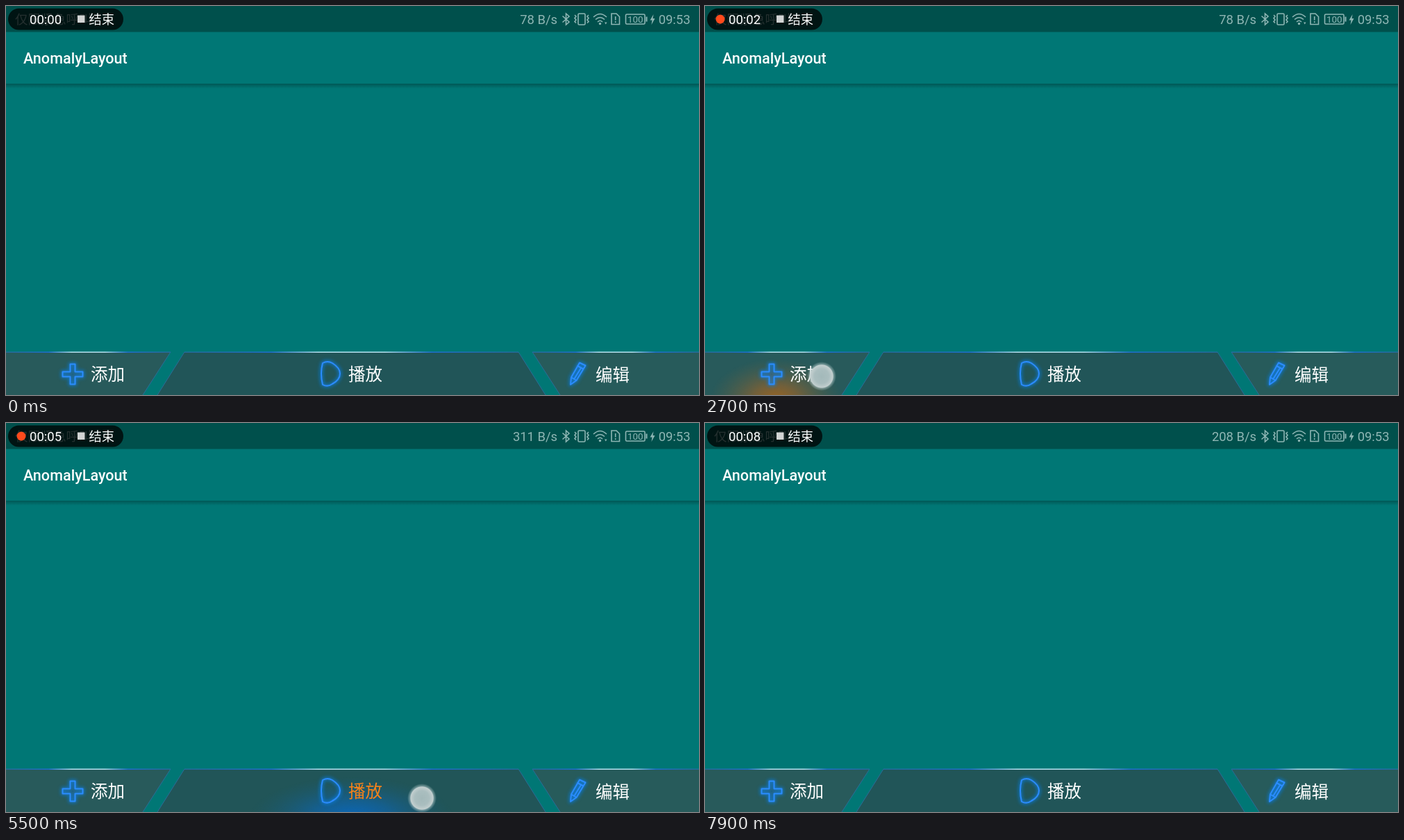
An HTML page that plays this animation: 998x561 px, repeating every 8 s.

```html
<!DOCTYPE html>
<html lang="zh-CN">
<head>
<meta charset="utf-8">
<title>AnomalyLayout</title>
<style>
  html, body { margin: 0; width: 100%; height: 100%; overflow: hidden; background: #007775; }
  svg { display: block; width: 998px; height: 561px; }
  text { font-family: Roboto, "Noto Sans CJK SC", "Noto Sans CJK", sans-serif; fill: #fff; }
  .status, .status text { font-size: 18.4px; fill: #8fb6b4; }
  .status .line { fill: none; stroke: #8fb6b4; stroke-width: 1.6; }
  .label { font-size: 24.5px; }
  .edge { fill: none; stroke: #2c6c98; stroke-width: 1; }
  .icon { fill: none; stroke-linejoin: round; stroke-linecap: round; }
  .icon .halo { stroke: #0a7fe8; stroke-width: 5; opacity: .7; filter: url(#soft); }
  .icon .core { stroke: #2b8dff; stroke-width: 2; }

  .anim { animation: 8s step-end infinite; }
  .dot { animation: blink 1s step-end infinite; }
  .left-on { animation-name: leftOn; }
  .mid-on { animation-name: midOn; }
  .mid-label { animation-name: midLabel; }
  .rate1 { animation-name: rate1; }
  .rate2 { animation-name: rate2; }
  .rate3 { animation-name: rate3; }
  .arrows { animation-name: arrows; }
  .touch { animation: touchOn 8s step-end infinite, drift 8s linear infinite; }

  @keyframes blink { 0% { opacity: 0 } 33% { opacity: 1 } 87%, 100% { opacity: 0 } }
  @keyframes leftOn { 0% { opacity: 0 } 11.7% { opacity: 1 } 37.1%, 100% { opacity: 0 } }
  @keyframes midOn { 0% { opacity: 0 } 47.1% { opacity: 1 } 92.1%, 100% { opacity: 0 } }
  @keyframes midLabel { 0% { fill: #fff } 47.1% { fill: #f5821a } 92.1%, 100% { fill: #fff } }
  @keyframes rate1 { 0% { opacity: 1 } 35.6%, 100% { opacity: 0 } }
  @keyframes rate2 { 0% { opacity: 0 } 35.6% { opacity: 1 } 74.7%, 100% { opacity: 0 } }
  @keyframes rate3 { 0% { opacity: 0 } 74.7%, 100% { opacity: 1 } }
  @keyframes arrows { 0% { opacity: 0 } 46.6% { opacity: 1 } 59.1%, 100% { opacity: 0 } }
  @keyframes touchOn {
    0% { opacity: 0 } 11.25% { opacity: 1 } 37.1% { opacity: 0 }
    46.6% { opacity: 1 } 92.1%, 100% { opacity: 0 }
  }
  @keyframes drift {
    0%, 15.4% { transform: translate(157px, 541px) }
    24.1%, 37.1% { transform: translate(168px, 534px) }
    46.6%, 53.7% { transform: translate(594px, 536px) }
    63.7%, 68.8% { transform: translate(599px, 541px) }
    86.2%, 100% { transform: translate(603px, 540px) }
  }
</style>
</head>
<body>
<svg viewBox="0 0 998 561">
  <defs>
    <filter id="soft" x="-50%" y="-50%" width="200%" height="200%"><feGaussianBlur stdDeviation="2.4"/></filter>
    <linearGradient id="shade" x2="0" y2="1">
      <stop stop-color="#003836" stop-opacity=".5"/><stop offset="1" stop-color="#003836" stop-opacity="0"/>
    </linearGradient>
    <linearGradient id="shine">
      <stop stop-color="#2a6fae" stop-opacity=".75"/>
      <stop offset=".26" stop-color="#1f6fd0"/>
      <stop offset=".4" stop-color="#b9e2f2"/>
      <stop offset=".6" stop-color="#b9e2f2"/>
      <stop offset=".74" stop-color="#1f6fd0"/>
      <stop offset="1" stop-color="#2a6fae" stop-opacity=".75"/>
    </linearGradient>
    <radialGradient id="amber" gradientUnits="userSpaceOnUse" cx="0" cy="0" r="1" gradientTransform="translate(102 568) scale(95 60)">
      <stop stop-color="#9a6420"/><stop offset=".35" stop-color="#8a6230" stop-opacity=".75"/>
      <stop offset="1" stop-color="#5c6048" stop-opacity="0"/>
    </radialGradient>
    <radialGradient id="azure" gradientUnits="userSpaceOnUse" cx="0" cy="0" r="1" gradientTransform="translate(498 568) scale(146 58)">
      <stop stop-color="#0a68bc"/><stop offset=".4" stop-color="#12629c" stop-opacity=".8"/>
      <stop offset="1" stop-color="#1c5a70" stop-opacity="0"/>
    </radialGradient>
    <radialGradient id="spot">
      <stop stop-color="#a3b9ba"/><stop offset=".5" stop-color="#aabebf"/>
      <stop offset=".77" stop-color="#c3cfcf"/><stop offset=".82" stop-color="#b8cccc" stop-opacity=".55"/>
      <stop offset="1" stop-color="#b8cccc" stop-opacity="0"/>
    </radialGradient>
    <path id="left" d="M0 499H237L197 561H0Z"/>
    <path id="mid" d="M257 499H738L777 561H218Z"/>
    <path id="right" d="M758 499H998V561H798Z"/>
    <path id="plus" d="M92.5 516.5h7v11h11v7h-11v11h-7v-11h-11v-7h11Z"/>
    <path id="play" d="M456 515Q463 511 470 515Q481 522 481 530Q481 539 470 545Q463 550 456 546Q452 530 456 515Z"/>
    <path id="pen" d="M826 514.5L834.5 518.5L821.5 540L813 546L814 535.5ZM823 519L831.5 523.5M814 535.5L821.5 540M827.5 523L818.5 537.5"/>
  </defs>

  <rect width="998" height="561" fill="#007775"/>
  <rect width="998" height="37.5" fill="#00504c"/>
  <rect y="112" width="998" height="7" fill="url(#shade)"/>
  <text x="25" y="83" font-size="21.6" font-weight="500">AnomalyLayout</text>

  <g class="status">
    <text x="13" y="26">仅限紧急呼叫</text>
    <g text-anchor="end">
      <text class="anim rate1" x="794" y="26">78 B/s</text>
      <text class="anim rate2" x="794" y="26">311 B/s</text>
      <text class="anim rate3" x="794" y="26">208 B/s</text>
      <text x="985.5" y="26">09:53</text>
    </g>
    <path class="line" d="M801.5 14.5L811 23L806.5 27V11L811 15L801.5 23.5"/>
    <rect class="line" x="824" y="11" width="10" height="16" rx="1.5"/>
    <path class="line" d="M819 13l2 2-2 2.500 2 2.500-2 2.500 2 2M839 13l-2 2 2 2.500-2 2.500 2 2.500-2 2"/>
    <path class="line" d="M846 16Q855.500 7 865 16M849 19.500Q855.500 13.500 862 19.500M852 23Q855.500 19.500 859 23"/>
    <circle cx="855.500" cy="25.500" r="1.700"/>
    <path d="M862 23.500h3.500l-1.750 3Z"/>
    <path class="anim arrows" d="M860 23l1.700-3 1.700 3ZM860 24h3.400l-1.700 3Z"/>
    <path class="line" d="M872 11h7l4.500 4.500v11h-11.500ZM877.700 15v5.500M877.700 22v2"/>
    <rect class="line" x="892.500" y="12" width="27.500" height="14" rx="1.500" stroke-width="1.300"/>
    <path d="M921.500 15.500h2v7h-2Z"/>
    <text x="906.300" y="24" text-anchor="middle" style="font-size:13.500px">100</text>
    <path d="M932.500 12L927.500 20.500H930.500L929.500 27L934.500 18H931.500Z"/>
  </g>

  <rect x="3" y="3.500" width="166" height="31" rx="15.500" fill="#000" fill-opacity=".74"/>
  <circle class="dot" cx="22" cy="19" r="6.500" fill="#ff4a1c"/>
  <text id="clock" x="34" y="26" font-size="18.500">00:00</text>
  <rect x="103" y="13.500" width="10.500" height="10.500" fill="#d2d4d4"/>
  <text x="119.500" y="26" font-size="18.300">结束</text>

  <use href="#left" fill="#285a5b"/>
  <use href="#mid" fill="#215558"/>
  <use href="#right" fill="#275b5b"/>
  <use class="anim left-on" href="#left" fill="url(#amber)"/>
  <use class="anim mid-on" href="#mid" fill="url(#azure)"/>
  <path class="edge" d="M237 499L197 561M257 499L218 561M738 499L777 561M758 499L798 561"/>
  <g fill="url(#shine)">
    <rect y="498.500" width="237" height="1.500"/>
    <rect x="257" y="498.500" width="481" height="1.500"/>
    <rect x="758" y="498.500" width="240" height="1.500"/>
  </g>

  <g class="icon"><use class="halo" href="#plus"/><use class="core" href="#plus"/></g>
  <g class="icon"><use class="halo" href="#play"/><use class="core" href="#play"/></g>
  <g class="icon"><use class="halo" href="#pen"/><use class="core" href="#pen"/></g>

  <text class="label" x="122" y="540">添加</text>
  <text class="label anim mid-label" x="493" y="540">播放</text>
  <text class="label" x="849" y="541">编辑</text>

  <circle class="touch" r="21" fill="url(#spot)"/>
</svg>
<script>
  const clock = document.getElementById('clock');
  const LOOP = 8000, LEAD = 130;

  function tick() {
    const now = document.timeline.currentTime ?? performance.now();
    const start = clock.getRootNode().querySelector('.touch').getAnimations()[0]?.startTime ?? 0;
    const t = Math.max(0, now - start) % LOOP;
    const label = '00:0' + Math.floor((t + LEAD) / 1000);
    if (clock.textContent !== label) clock.textContent = label;
    requestAnimationFrame(tick);
  }
  requestAnimationFrame(tick);
</script>
</body>
</html>
```
